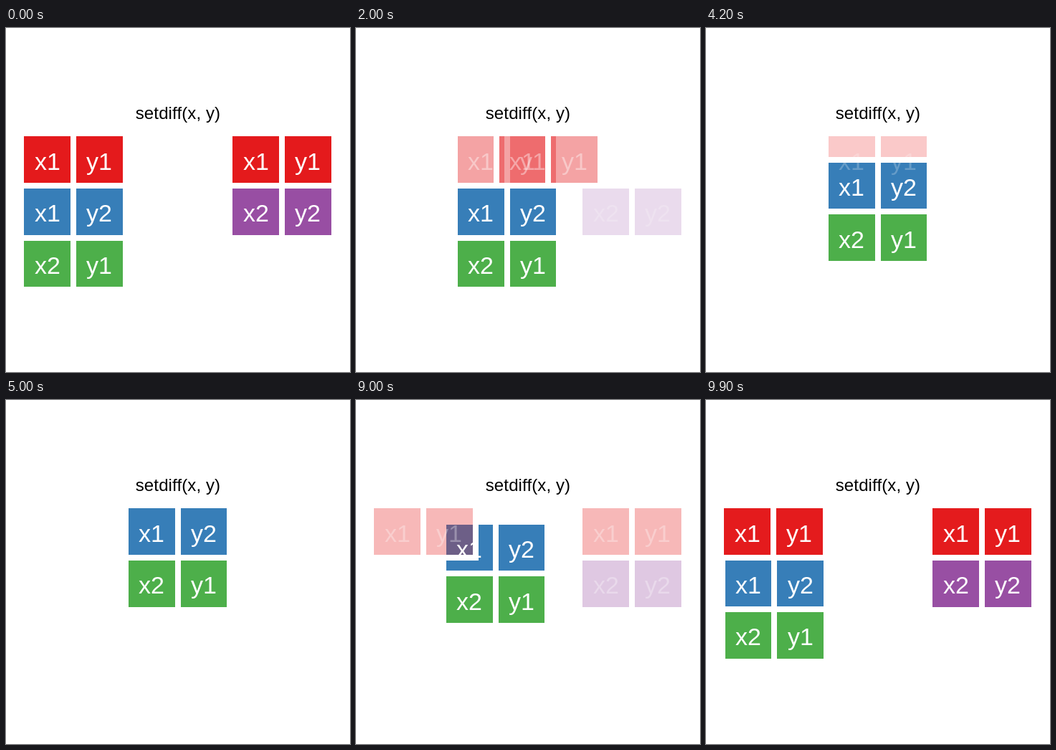
An HTML page that plays this animation: 480 by 480 pixels, repeating every 10000 ms.

```html
<!DOCTYPE html>
<html lang="en">
<head>
<meta charset="utf-8">
<title>setdiff(x, y)</title>
<style>
  html, body { margin: 0; width: 100%; height: 100%; overflow: hidden; background: #fff; }
  svg { display: block; width: 100%; height: 100%; }
  text { font-family: "Liberation Sans", Arial, sans-serif; }
  .title { font-size: 24px; letter-spacing: 0.12px; text-anchor: middle; fill: #000; }
  #labels { font-size: 34px; fill: #fff; }
  #tiles { stroke: #fff; stroke-width: 8; }
</style>
</head>
<body>
<svg viewBox="0 0 480 480">
  <text class="title" x="240" y="127">setdiff(x, y)</text>
  <g id="tiles"></g>
  <g id="labels"></g>
</svg>
<script>
const LOOP = 10000, STEP = 100;
const PITCH = 72.75, SIZE = 64.75, TOP = 151.2;
const LEFT = 25.25, MID = LEFT + 2 * PITCH, RIGHT = LEFT + 4 * PITCH;
const LABEL_X = 14.4, LABEL_Y = 46.4;
const RED = '#e41a1c', BLUE = '#377eb8', GREEN = '#4daf4a', PURPLE = '#984ea3';
const DIM = 0.25;

const mix = (a, b, k) => a + (b - a) * k;
const ease = (n, from, count) => {
  const p = Math.min(1, Math.max(0, (n - from) / count));
  return (1 - Math.cos(Math.PI * p)) / 2;
};

// Each place rule takes the eased progress of merge, drop and reset,
// and gives x, row and opacity.
const dimmed = home => (m, d, r) =>
  [mix(home, MID, m), 0, r > 0 ? 0 : mix(1, DIM, m) * (1 - d)];
const kept = row => (m, d, r) =>
  [mix(mix(LEFT, MID, m), LEFT, r), row - d + r, 1];
const entering = (home, row) => (m, d, r) => [home, row, r];

// Painting order: leaving rows lie below the kept ones, entering rows above.
const rows = [
  [RED, 'x1', 'y1', dimmed(LEFT)],
  [RED, 'x1', 'y1', dimmed(RIGHT)],
  [BLUE, 'x1', 'y2', kept(1)],
  [GREEN, 'x2', 'y1', kept(2)],
  [PURPLE, 'x2', 'y2', (m, d, r) => [RIGHT, 1, r > 0 ? 0 : 1 - m]],
  [RED, 'x1', 'y1', entering(LEFT, 0)],
  [RED, 'x1', 'y1', entering(RIGHT, 0)],
  [PURPLE, 'x2', 'y2', entering(RIGHT, 1)]
];

function add(parent, tag) {
  const el = document.createElementNS('http://www.w3.org/2000/svg', tag);
  return document.getElementById(parent).appendChild(el);
}

function set(el, attrs) {
  for (const key in attrs) el.setAttribute(key, attrs[key]);
}

const cells = rows.flatMap(([color, a, b, place]) => [a, b].map((word, col) => {
  const rect = add('tiles', 'rect'), label = add('labels', 'text');
  set(rect, { fill: color });
  label.textContent = word;
  return { rect, label, col, place };
}));

function drawCell({ rect, label, col, place }, progress) {
  const [left, row, alpha] = place(...progress);
  const display = alpha > 0 ? 'inline' : 'none';
  const x = left + col * PITCH, y = TOP + row * PITCH;
  const x0 = Math.round(x), x1 = Math.round(x + SIZE);
  const y0 = Math.round(y), y1 = Math.round(y + SIZE);
  // The outline runs just outside the visible square.
  set(rect, {
    x: x0 - 4, y: y0 - 4, width: x1 - x0 + 8, height: y1 - y0 + 8,
    'fill-opacity': alpha, display
  });
  set(label, {
    x: Math.round(x + LABEL_X), y: Math.round(y + LABEL_Y),
    'fill-opacity': alpha, display
  });
}

let shown = -1;
function draw(time) {
  const n = Math.floor((time % LOOP) / STEP);
  if (n !== shown) {
    shown = n;
    // The reset ends exactly where the loop begins.
    const progress = [ease(n, 8, 17), ease(n, 34, 16), ease(n, 84, 16)];
    cells.forEach(cell => drawCell(cell, progress));
  }
}

function tick() {
  draw(performance.now());
  requestAnimationFrame(tick);
}
draw(0);
requestAnimationFrame(tick);
</script>
</body>
</html>
```
